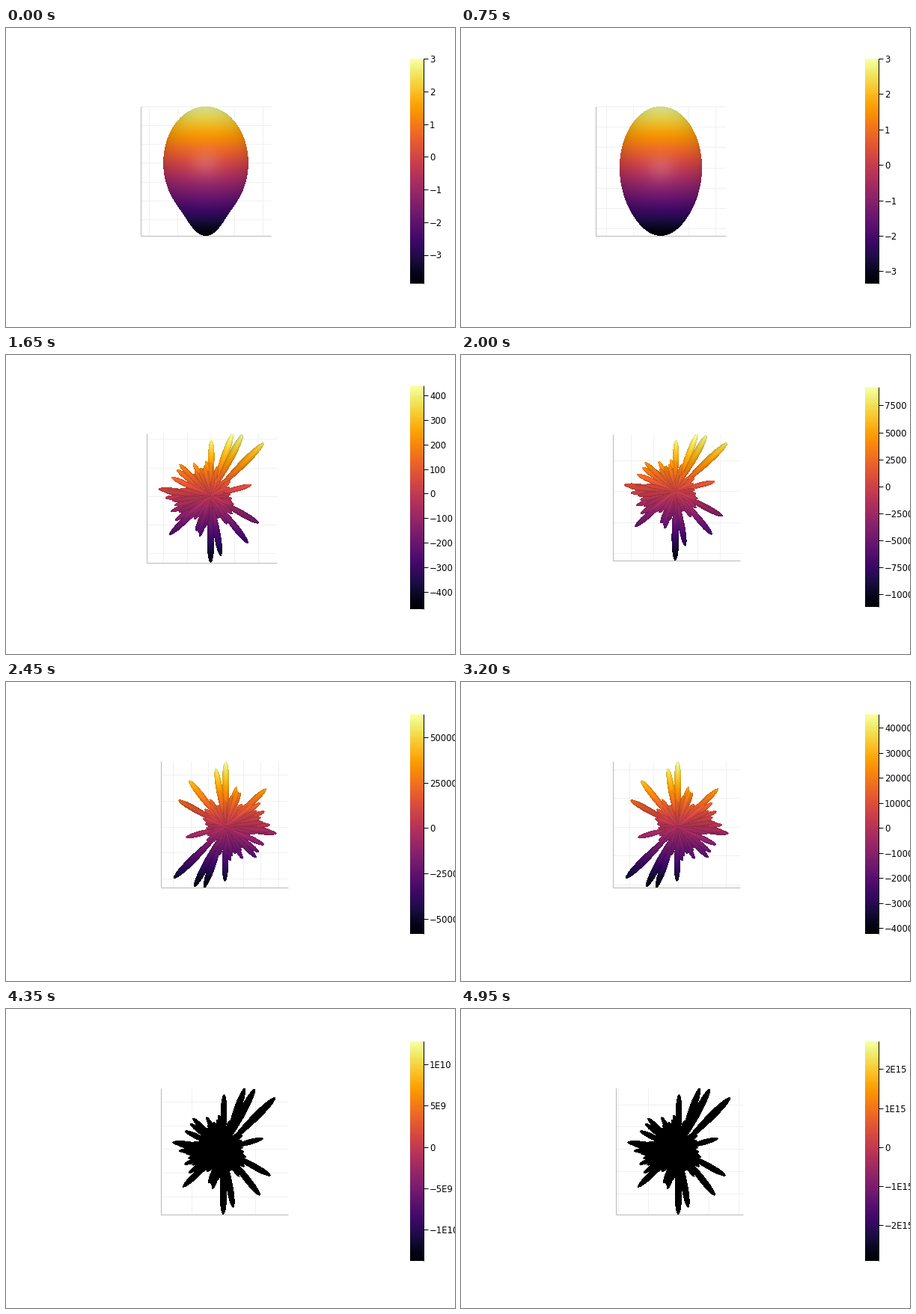
Write a matplotlib script that moves like this. It is 600 px wide and 400 px high and loops after 5000 ms.

```python
import math
import random

import matplotlib
import matplotlib.pyplot as plt
import numpy as np
from matplotlib.animation import FuncAnimation

W, H, FRAMES = 600, 400, 100
BASE = 3.0      # radius of the undisturbed body
UNIT = 84.5     # spike length in pixels for amplitude 1
FLIPS = (44, 82)
INFERNO = matplotlib.colormaps["inferno"]

plt.rcParams["font.family"] = "DejaVu Sans"

# longest spikes, tip relative to the centre, y pointing down; south pole first
LONG = [(0, 86), (1, -72), (28, -80), (41, -79), (68, -68), (52, -14),
        (62, 35), (48, 61), (13, 77), (-53, 50), (-51, 20), (-67, -9)]


def short_spikes(count=64):
    """Fill all directions, reaching further on the left side."""
    rng = random.Random(4)
    spikes = []
    for i in range(count):
        a = 2.4 * i
        length = rng.uniform(0.5, 1) * (49 + 16 * math.cos(a - 2.9))
        spikes.append((length * math.cos(a), length * math.sin(a)))
    return spikes


SPIKES = np.array(LONG + short_spikes(), float)
TONES = np.random.default_rng(7).uniform(0.92, 1.06, len(SPIKES))


def amplitude(i):
    return 10 ** np.interp(i, [0, 22, 25, 40, 49, 64, 75, 99],
                           [-4, 0.42, 1.152, 3.987, 4.79, 4.65, 4.805, 15.458])


def pose(i):
    return -1 if FLIPS[0] <= i < FLIPS[1] else 1


def body_radius(angle, i):
    """Sphere with a bump at the south pole that spreads out."""
    spread = 1 + i / 10
    return BASE + 0.88 / spread * np.exp(-(angle / 0.41) ** 2 / spread)


def spike_tips(i, amp):
    v = SPIKES * pose(i)
    v[0] *= np.interp(i, [25, 40, 49], [0.85, 1.13, 1.0])
    v = v / UNIT * amp
    v[:, 0] /= 0.67
    unit = v / np.hypot(v[:, 0], v[:, 1])[:, None]
    return v + unit * BASE * (0.65 - 0.3 * unit[:, 1:])


def nice_step(span, count, bases):
    decade = 10.0 ** math.floor(math.log10(span / count))
    steps = [b * decade * m for m in (0.1, 1, 10) for b in bases]
    return min(steps, key=lambda s: abs(math.log(span / s / count)))


def multiples(step, lo, hi):
    first, last = math.ceil(lo / step - 1e-6), math.floor(hi / step + 1e-6)
    return [k * step for k in range(first, last + 1)]


def tick_labels(ticks, step):
    biggest = max(abs(t) for t in ticks)

    def text(t):
        if t == 0 and step >= 1:
            return "0"
        if biggest >= 1e5:
            e = math.floor(math.log10(abs(t)) + 1e-9)
            return f"{t / 10.0 ** e:.3g}E{e}"
        return f"{t:.0f}" if abs(step - round(step)) < 1e-9 else f"{t:.1f}"

    return [text(t).replace("-", "\u2212") for t in ticks]


def render(i, amp, tips, size, xs, zs, cx, cy):
    """Colour image of the body and its spikes, coloured by height."""
    w, h = size
    px, py = np.meshgrid(np.arange(w) + 0.5 - cx, np.arange(h) + 0.5 - cy)
    x, y = px / xs, py / zs
    rho = np.hypot(x, y) / body_radius(np.arctan2(np.abs(x), y), i)
    mask = rho <= 1
    shade = 0.82 + 0.18 * np.sqrt(np.clip(1 - rho ** 2, 0, 1))

    cover = min(1.0, amp / 6)
    thin = amp / (amp + 1)
    for (tx, ty), tone in zip(tips * [xs, zs], TONES):
        length = math.hypot(tx, ty)
        t = (px * tx + py * ty) / length ** 2
        side = np.abs(px * ty - py * tx) / length
        u = np.clip(t, 0, 1)
        half = (1.8 + 0.034 * length) * thin * u * np.sqrt(1 - u) / 0.385
        inside = (t > 0) & (t < 1) & (side <= half)
        lit = tone * (1 - 0.2 * (side / np.maximum(half, 1e-6)) ** 2)
        old = np.where(mask, shade, lit)
        shade = np.where(inside, old + (lit - old) * cover, shade)
        mask |= inside

    img = INFERNO(1 - (np.arange(h) + 0.5) / h)[:, None, :].repeat(w, axis=1)
    rgb = img[..., :3] * shade[..., None]
    glow = 0.14 * np.exp(-(px ** 2 + py ** 2) / 400) * (1 - cover)
    rgb += (1 - rgb) * glow[..., None]
    if amp > 1e10:      # lighting overflows and the surface goes black
        rgb[:] = 0
    img[..., :3] = np.clip(rgb, 0, 1)
    img[..., 3] = mask
    return img


fig = plt.figure(figsize=(6, 4), dpi=100, facecolor="white")
ax = fig.add_axes([0, 0, 1, 1])


def line(x, y, color, z=1):
    ax.plot(x, y, color=color, lw=0.72, zorder=z, solid_capstyle="butt")


def draw(i):
    ax.clear()
    ax.axis("off")

    amp = amplitude(i)
    tips = spike_tips(i, amp)
    hi = max(BASE, -tips[:, 1].min())
    lo = max(body_radius(0, i), tips[:, 1].max())
    span = hi + lo
    step = nice_step(span, 6.2, (1, 2.5, 5))
    ticks = multiples(step, -lo, hi)
    labels = tick_labels(ticks, step)
    chars = max(map(len, labels))

    # wide labels push the plot box right and shrink it a little
    if chars <= 4 and amp < 1e4:
        left, top, w, h = 180 + 4 * max(chars - 2, 0), 105, 174, 173
        c_top, c_bottom = 41, 344 - max(chars, 2)
    else:
        left, top, w, h = 203 + 4 * (len(ticks) < 6), 106, 170, 169
        c_top, c_bottom = 43, 337
    right, bottom = left + w, top + h

    half = 1.47 * amp + 1.53 * BASE
    xs, zs = w / 2 / half, h / span
    cx, cy = w / 2 - 1.6 * pose(i) * amp / (amp + 40), hi * zs
    bases = (1, 2, 2.5, 5)
    for g in multiples(nice_step(2 * half, 5.2, bases), -half, half):
        x = left + cx + g * xs
        line([x, x], [top, bottom], "#f0f0f0")
    for g in multiples(nice_step(span, 5.2, bases), -lo, hi):
        y = top + cy - g * zs
        line([left, right], [y, y], "#f0f0f0")
    line([left, left], [top, bottom], "#b8b8b8", 2)
    line([left, right], [bottom, bottom], "#b8b8b8", 2)

    ax.imshow(render(i, amp, tips, (w, h), xs, zs, cx, cy), zorder=3,
              extent=(left, right, bottom, top), interpolation="nearest", aspect="auto")

    # colour bar
    bar = INFERNO(np.linspace(1, 0, 256))[:, None, :]
    ax.imshow(bar, extent=(540, 558, c_bottom, c_top),
              interpolation="nearest", aspect="auto", zorder=3)
    line([558, 558], [c_top, c_bottom], "black", 4)
    for value, label in zip(ticks, labels):
        y = c_top + (hi - value) / span * (c_bottom - c_top)
        line([558, 564], [y, y], "black", 4)
        ax.text(566, y, label, fontsize=8.4, va="center_baseline", ha="left")

    ax.set_xlim(0, W)
    ax.set_ylim(H, 0)
    return []


anim = FuncAnimation(fig, draw, frames=FRAMES, interval=50, init_func=lambda: [],
                     repeat=True, repeat_delay=0)
plt.show()
```
